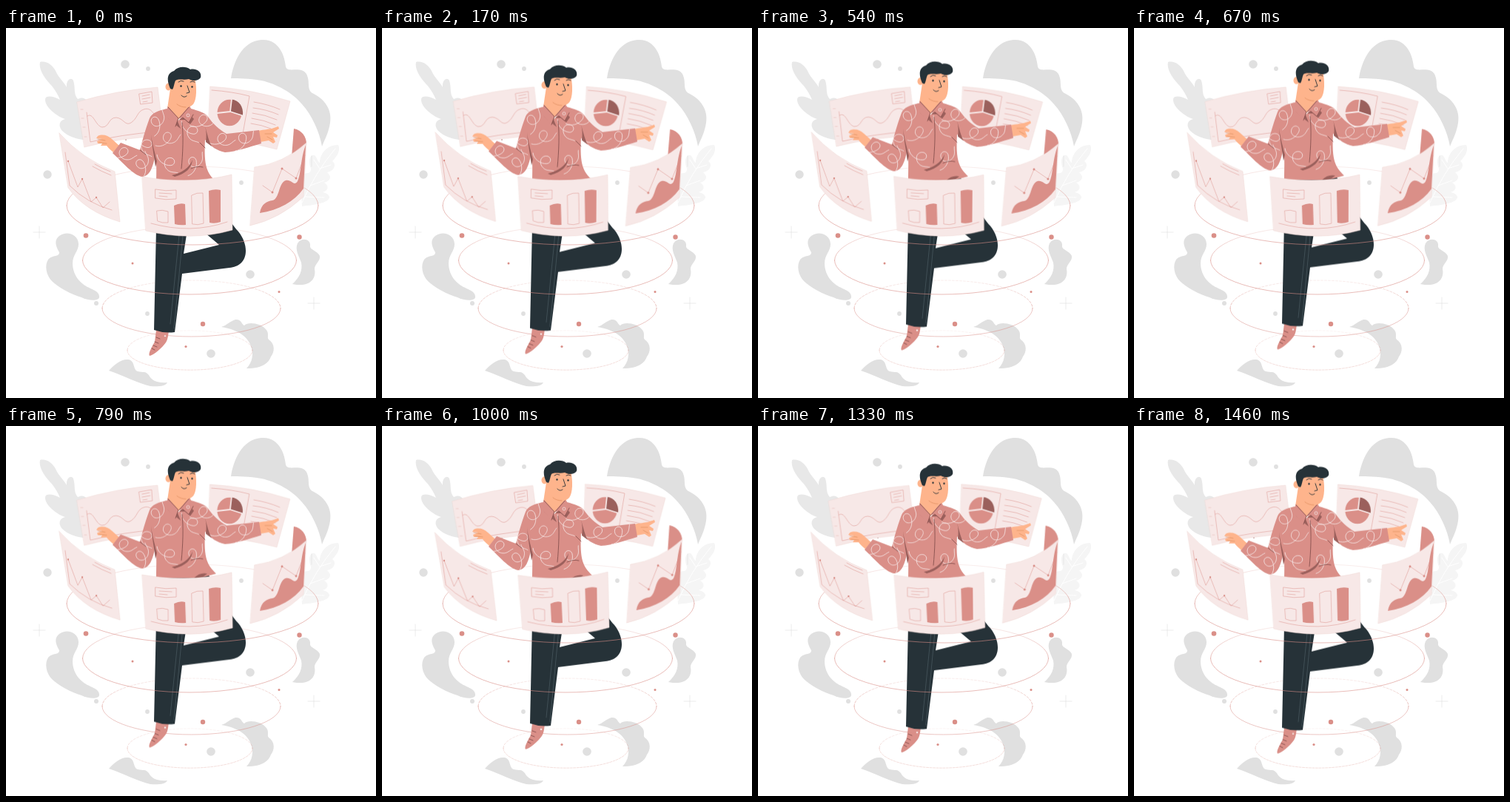
An HTML page without scripts for the animation above (1500 ms loop, 500 by 500 pixels).

```html
<!DOCTYPE html>
<html lang="en">
<head>
<meta charset="utf-8">
<title>Floating dashboards</title>
<style>
  html, body { margin: 0; width: 100%; height: 100%; overflow: hidden; background: #fff; }
  svg { display: block; width: 100vw; height: 100vh; }
  path, ellipse { stroke-linecap: round; stroke-linejoin: round; }
  .grey { fill: #e0e0e0; }
  .pink { fill: #da8f88; }
  .skin { fill: #feb48c; }
  .dark { fill: #263238; }
  .shade { fill: #9b605c; }
  .panel { fill: #f7e8e7; stroke: #efd6d3; stroke-width: .5; }
  .line { fill: none; stroke: #da8f88; stroke-width: .5; }
  .ink { fill: none; stroke: #263238; stroke-width: .9; }
  .fold { fill: none; stroke: #7d4a47; stroke-width: .8; }
  .curl { fill: none; stroke: #f7e8e7; stroke-width: .75; }
  .faint { fill: none; stroke: #dedede; stroke-width: .6; }
  .vein { fill: none; stroke: #fff; stroke-width: .9; }
  .ring { fill: none; stroke-width: .6; }
  .body { animation: float 1.5s infinite; }
  .sway { transform-origin: 245px 185px; animation: sway 1.5s infinite; }
  @keyframes float {
    0% { transform: none; animation-timing-function: cubic-bezier(.33, .35, .66, .95); }
    50% { transform: translateY(-8.8px); animation-timing-function: cubic-bezier(.33, .2, .66, .75); }
    100% { transform: none; }
  }
  @keyframes sway {
    0%, 50% { transform: none; animation-timing-function: cubic-bezier(.39, .58, .57, 1); }
    25% { transform: rotate(.5deg); animation-timing-function: cubic-bezier(.43, 0, .61, .42); }
    75% { transform: rotate(-.75deg); animation-timing-function: cubic-bezier(.43, 0, .61, .42); }
    100% { transform: none; }
  }
</style>
</head>
<body>
<svg viewBox="0 0 500 500">
  <defs>
    <linearGradient id="fade" x1="0" y1="0" x2="0" y2="1">
      <stop offset="0" stop-color="#da8f88" stop-opacity=".25"/>
      <stop offset="1" stop-color="#da8f88"/>
    </linearGradient>
    <path id="curl" d="M-16 9C-8 12 2 6 5-2C7-9-2-12-5-5C-8 3 1 8 8 5C14 3 15-3 18-6"/>
    <path id="shirt" d="M217 109C205 112 197 115 194 122C188 138 184 153 181 165L155 155L144 169C158 182 172 199 184 201C195 200 198 188 202 172C204 186 203 198 203 214L262 214L284 208C272 196 267 188 269 151C277 160 285 166 296 168C312 167 328 161 345 156L342 138L298 143C288 137 280 130 273 120C269 114 260 112 250 109L233 125Z"/>
    <clipPath id="shirtClip"><use href="#shirt"/></clipPath>
  </defs>

  <!-- backdrop -->
  <g class="grey">
    <path d="M304 68C307 48 318 18 345 16C370 14 377 40 378 52C380 62 398 50 406 62C412 74 405 84 416 89C430 96 441 110 438 128C436 142 430 152 427 160C424 142 414 118 400 103C388 88 365 75 345 71C328 68 315 68 304 68Z"/>
    <path d="M72 281C82 273 98 279 98 292C98 302 90 306 90 318C90 330 96 340 104 346C112 353 127 354 126 364C125 369 112 369 102 364C88 360 70 350 62 342C54 334 52 320 57 313C63 306 72 310 72 303C68 296 64 287 72 281Z"/>
    <path d="M394 291C400 282 412 286 411 294C410 300 420 300 424 308C425 316 417 318 417 326C419 336 414 346 400 347C395 347 390 347 387 346C397 337 401 327 399 317C396 308 390 300 394 291Z"/>
    <path d="M291 404C298 402 303 396 310 394C318 393 318 400 322 402C328 396 345 400 350 406C357 412 352 418 355 421C364 427 363 438 358 444C355 452 348 460 325 460C333 452 335 440 331 430C327 418 315 408 291 404Z"/>
    <path d="M139 463C146 455 156 447 165 448C175 449 171 462 178 464C186 466 188 463 193 469C197 477 205 480 218 479C216 484 205 485 195 484C178 480 160 470 139 463Z"/>
    <circle cx="161" cy="49" r="5.8"/><circle cx="192" cy="55" r="2.9"/>
    <circle cx="56" cy="198" r="5.7"/><circle cx="318" cy="209" r="2.9"/>
    <circle cx="330" cy="333" r="5.8"/><circle cx="191" cy="386" r="2.9"/>
    <circle cx="122" cy="372" r="3"/><circle cx="277" cy="440" r="5.8"/>
  </g>
  <path fill="#e8e8e8" d="M46 46C54 44 63 49 68 60C72 68 79 74 82 80C81 70 88 66 91 71C94 80 91 90 97 96C104 92 112 95 112 110L118 150C105 154 85 148 76 139C70 132 72 125 80 123C72 121 52 108 53 96C54 90 66 93 73 97C70 90 66 82 58 74C50 65 44 54 46 46Z"/>
  <path fill="#f5f5f5" d="M449 158C453 166 446 175 441 180C447 184 444 193 434 195C440 200 440 206 430 209C436 213 437 219 428 222C440 225 440 232 428 236C415 240 404 240 400 241L398 200C404 193 412 200 412 190C407 178 412 170 417 172C421 176 421 181 424 182C424 172 432 158 449 158Z"/>
  <path class="vein" d="M445 163Q418 195 400 236M424 190L416 178M424 190L439 185M411 213L430 206M404 228L430 229"/>
  <path class="faint" d="M45 268V284M37 276H53M416 364V380M408 372H424M413 173V187"/>
  <g class="pink">
    <circle cx="108" cy="280.5" r="3.3"/><circle cx="396.5" cy="282.5" r="3.2"/>
    <circle cx="171" cy="318" r="1.5"/><circle cx="369" cy="356.5" r="1.5"/>
    <circle cx="266" cy="400" r="3.2"/><circle cx="243" cy="430.5" r="1.6"/>
  </g>
  <circle class="shade" cx="162" cy="151" r=".8"/>

  <!-- far halves of the rings -->
  <g class="ring" stroke="url(#fade)">
    <path d="M82 240A170 53 0 0 1 422 240"/>
    <path d="M103.5 314A144.5 46 0 0 1 392.5 314"/>
    <path d="M130 379A120.5 38 0 0 1 371 379" stroke-dasharray="3 2"/>
    <path d="M164 435.5A84 26.5 0 0 1 333 435.5" opacity=".6" stroke-dasharray="3 2"/>
  </g>

  <!-- rear panels -->
  <g class="sway">
    <path class="panel" d="M96 100Q150 84 205 80L213 146Q155 148 106 161Z"/>
    <g class="line">
      <path d="M109 114L114 154Q155 144 205 140"/>
      <path d="M110 119C118 113 121 133 130 134C140 134 138 121 149 121C159 122 161 133 169 128C178 122 177 113 186 110C194 107 198 113 202 119"/>
      <path d="M180 89L197 86L198 101L182 103ZM184 92L194 90M184 96L195 94M185 100L191 99"/>
      <path d="M101 110H104M102 122H105M104 134H107M106 147H109" opacity=".6"/>
    </g>
    <path class="panel" d="M276 79Q330 82 384 99L366 164Q320 152 273 148Z"/>
    <g class="line">
      <path d="M278 84Q306 86 329 92L320 143"/>
      <path d="M335 100Q354 103 370 110M334 108Q352 110 368 117M333 115Q350 117 366 124M332 122Q348 124 364 131M331 129Q346 131 358 136"/>
    </g>
    <ellipse class="pink" cx="302" cy="114.5" rx="16.5" ry="17.8"/>
    <path class="shade" d="M303 113L305 96.5C315 98 321 106 320 118Z"/>
    <path d="M305 96L303 113L320 118.5M303 113L285 115" fill="none" stroke="#f7e8e7" stroke-width="1.8"/>
  </g>

  <!-- figure -->
  <g class="body">
    <path class="pink" d="M203 408L201 424C196 433 192 440 194 443C200 442 211 432 216 425C219 420 219 416 220 409Z"/>
    <path class="fold" d="M203 418L208 420M201 424L206 426M199 429L204 431M197 433L201 435"/>
    <circle cx="215" cy="416" r="1.3" fill="#f7e8e7"/>
    <path class="dark" d="M203 210L274 210C286 234 302 262 314 275C321 284 324 293 324 301C324 316 314 323 302 324L238 332L228 411Q214 413 200 408L203 270ZM244 279L240 305L288 293L262 271Z" fill-rule="evenodd"/>
    <path d="M239 280L227 406M234 280L222 400" fill="none" stroke="#52636b" stroke-width=".6"/>

    <path class="skin" d="M153 159L143 150C138 145 130 143 124 146L122 149L130 150L123 153L124 156L130 156L128 159L136 159C139 163 142 165 145 168Z"/>
    <path class="skin" d="M341 139C350 137 354 137 359 136L368 133L369 136L361 141L367 145L366 148L361 147L364 154L361 156L355 152L344 154Z"/>
    <path d="M124 150L134 152M126 155L136 156M350 143L359 143M353 147L360 151" fill="none" stroke="#d98c5b" stroke-width=".6"/>
    <use href="#shirt" class="pink"/>
    <path class="skin" d="M222 82L218 109L232 124L250 110L245 98Z"/>
    <g class="curl" clip-path="url(#shirtClip)">
      <use href="#curl" x="218" y="150"/>
      <use href="#curl" transform="translate(204 128) rotate(-50)"/>
      <use href="#curl" transform="translate(250 139) rotate(75)"/>
      <use href="#curl" transform="translate(266 126) rotate(12)"/>
      <use href="#curl" transform="translate(219 182) rotate(65)"/>
      <use href="#curl" transform="translate(254 183) rotate(-35)"/>
      <use href="#curl" transform="translate(188 157) rotate(80)"/>
      <use href="#curl" transform="translate(158 170) rotate(25)"/>
      <use href="#curl" transform="translate(184 185) rotate(-60)"/>
      <use href="#curl" transform="translate(291 151) rotate(20)"/>
      <use href="#curl" transform="translate(321 151) rotate(-25)"/>
    </g>
    <path class="shade" d="M224 199C237 196 248 189 252 178C251 189 243 197 228 201ZM196 144C198 158 201 168 204 180L202 188C200 172 197 158 196 144ZM269 133C271 140 271 147 270 154L278 160C274 153 272 143 269 133ZM254 214Q262 206 272 208L264 214Z"/>
    <path class="fold" d="M238 128C240 145 239 170 237 190M181 165L189 171M269 162L262 155M250 190Q258 186 266 188"/>
    <path class="shade" d="M218 113L231 124L236 136L232 133L219 122ZM234 124L246 114L254 123L249 130L242 124Z"/>
    <path class="pink" d="M219 106L233 122L229 133L214 117ZM233 122L248 105L254 117L247 128L239 121Z"/>
    <path class="fold" d="M219 107L233 122L229 133M234 122L247 107M239 121L247 128L253 117"/>
    <circle cx="246" cy="118" r="2" class="curl"/>

    <path class="skin" d="M225 66L255 66C258 80 258 96 253 103C248 109 237 108 231 103L222 86Z"/>
    <ellipse class="skin" cx="219.5" cy="79.5" rx="4" ry="5"/>
    <path d="M231 103Q236 107 243 107" fill="none" stroke="#e39265" stroke-width=".8"/>
    <path class="dark" d="M222 82C217 71 217 61 227 58C233 51 244 52 249 56C257 54 265 59 263 67C260 72 252 72 247 69C240 71 234 68 229 71C227 75 227 80 225 83Z"/>
    <path class="ink" d="M233 73Q236 70 240 72M249 73Q252 71 255 73"/>
    <circle class="dark" cx="236.5" cy="78.5" r="1.2"/><circle class="dark" cx="251.5" cy="79.5" r="1.2"/>
    <path class="ink" d="M237 91Q240 95 244 92M245 78L248 87L244 88" stroke-width=".8"/>
  </g>

  <!-- near halves of the rings -->
  <g class="ring" stroke="#da8f88">
    <path d="M82 240A170 53 0 0 0 422 240"/>
    <path d="M103.5 314A144.5 46 0 0 0 392.5 314"/>
    <path d="M130 379A120.5 38 0 0 0 371 379" opacity=".85"/>
    <path d="M164 435.5A84 26.5 0 0 0 333 435.5" opacity=".5" stroke-dasharray="3 1.5"/>
  </g>

  <!-- front panels -->
  <g class="sway">
    <path class="panel" d="M72 142Q103 177 147 194L154 262Q107 248 84 216Z"/>
    <g class="line">
      <path d="M80 168L86 213Q110 237 143 246"/>
      <path d="M84 180L97 215L103 204L115 235L122 229L131 243L140 235"/>
      <path d="M117 187Q129 194 142 199M120 184Q130 190 141 194"/>
    </g>
    <g class="pink">
      <circle cx="84" cy="180" r="1.2"/><circle cx="103" cy="204" r="1.2"/><circle cx="122" cy="229" r="1.2"/>
      <path d="M389 136C400 138 406 147 406 157L386 174Z"/>
    </g>

    <path class="panel" d="M336 188Q375 183 406 155L402 228Q370 258 330 267Z"/>
    <path class="pink" d="M343 250C345 238 352 234 360 233C370 231 368 209 378 206C386 204 389 215 394 207C399 197 398 176 405 158L402 217C389 235 369 246 343 250Z"/>
    <path class="line" d="M347 213L360 222L373 190L392 203L404 172"/>
    <circle class="pink" cx="360" cy="222" r="1.5"/><circle class="pink" cx="373" cy="190" r="1.5"/><circle class="pink" cx="392" cy="203" r="1.5"/>

    <path class="panel" d="M184 201Q250 212 305 198L306 273Q250 289 189 274Z"/>
    <g class="line">
      <path d="M202 218Q216 221 230 219V231Q216 233 202 230ZM207 223L224 224M207 227L218 228"/>
      <path d="M204 247Q211 245 219 248V263Q211 264 205 261ZM251 226Q258 222 266 223L267 264Q259 267 252 265Z"/>
      <path d="M196 264Q250 279 299 262"/>
    </g>
    <path class="pink" d="M227 240Q235 236 242 238L243 266Q235 267 228 265ZM274 220Q282 217 290 219V262Q282 265 275 263Z"/>
  </g>
</svg>
</body>
</html>
```
